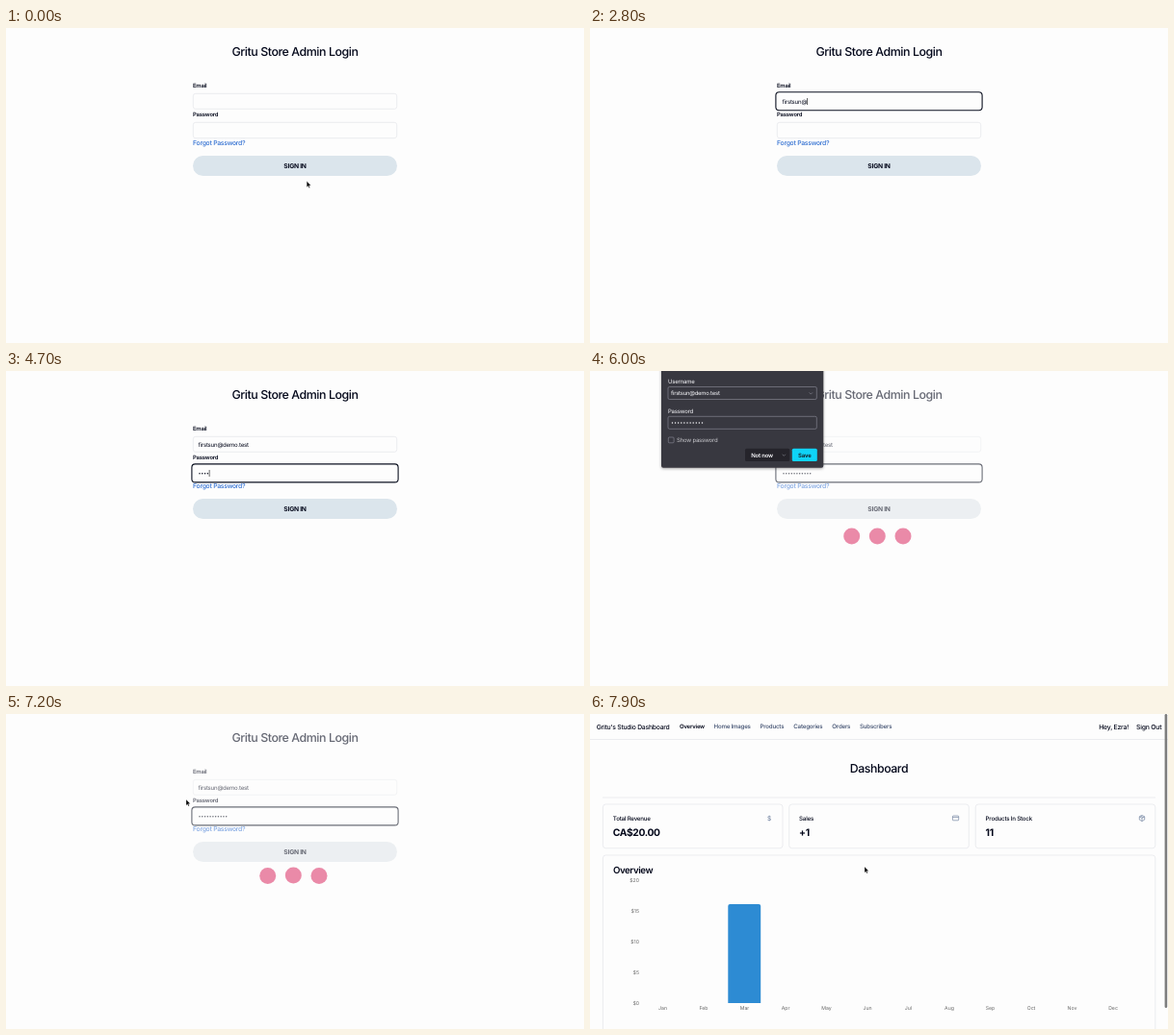
Write an HTML page that moves like this. It is 600 px wide and 328 px high and loops after 8 s.

```html
<!DOCTYPE html>
<html lang="en">
<head>
<meta charset="utf-8">
<title>Store admin login</title>
<style>
  html, body { margin: 0; width: 100%; height: 100%; overflow: hidden; background: #fdfdfd; }
  svg { display: block; width: 600px; height: 328px; }
  text { font: 500 6px Inter, "Open Sans", sans-serif; letter-spacing: -.035em; fill: #03071a; text-rendering: geometricPrecision; }
  .field, .card { fill: #fdfdfd; stroke: #e4e6ea; stroke-width: .7; }
  .icon { fill: none; stroke: #5d7193; stroke-width: .6; }
  .axis { font-size: 5.2px; font-weight: 400; letter-spacing: 0; fill: #666; }
  #popup text { fill: #fbfbfe; font-weight: 400; }
  #popup .box { fill: none; stroke: #8f8f9d; stroke-width: .6; }
</style>
</head>
<body>
<svg viewBox="0 0 600 328">
  <defs>
    <filter id="shadow" x="-10%" y="-10%" width="120%" height="125%">
      <feDropShadow dx="0" dy="1" stdDeviation="1.6" flood-opacity=".35"/>
    </filter>
  </defs>
  <g id="login">
    <g id="form"></g>
    <g id="loader" fill="#ea8aa8"></g>
    <g id="popup"></g>
  </g>
  <g id="dash"></g>
  <path id="pointer" d="M0 0V6.2L1.4 4.9L2.3 7L3.3 6.6L2.4 4.5H4.3Z" fill="#000" stroke="#fff" stroke-width=".3"/>
</svg>
<script>
const LOOP = 8000, LOADING = 6000, POPUP_END = 6800, DASH = 7600, GROW = 7700;
const EMAIL = 'firstsun@demo.test';
const emailKeys = [1400, 1500, 1700, 1900, 2300, 2400, 2500, 2600, 2800,
  2900, 3100, 3200, 3300, 3400, 3600, 3700, 3800, 3900];
const passKeys = [4300, 4500, 4600, 4700, 4900, 5000, 5000, 5200, 5300, 5400, 5700];
const path = [[100, 312.2, 159.6], [600, 290, 87], [900, 290, 87],
  [6300, 258, 104], [6700, 187, 89], [7300, 187, 89], [7700, 285, 159]];

const $ = id => document.getElementById(id);
const text = (x, y, s, attrs = '') => `<text x="${x}" y="${y}" ${attrs}>${s}</text>`;
const rect = (x, y, w, h, r, attrs = '') =>
  `<rect x="${x}" y="${y}" width="${w}" height="${h}" rx="${r}" ${attrs}/>`;
const font = (size, weight = 500, more = '') => `style="font-size:${size}px;font-weight:${weight};${more}"`;
const mid = 'text-anchor="middle" ';
const dots = (n, x, y, step) =>
  Array.from({length: n}, (_, i) => `<circle cx="${x + i * step}" cy="${y}" r=".75"/>`).join('');

$('form').innerHTML =
  text(300, 28.5, 'Gritu Store Admin Login', mid + font(12.4)) +
  text(194, 62.3, 'Email', font(5.9, 600)) + text(194, 92.3, 'Password', font(5.9, 600)) +
  rect(194.3, 68.3, 211.4, 16, 2.5, 'class="field"') +
  rect(194.3, 98.3, 211.4, 16.4, 2.5, 'class="field"') +
  text(194, 122.3, 'Forgot Password?', font(6.8, 500, 'fill:#2a6bd0')) +
  rect(194, 133, 212, 21, 10.5, 'id="button"') +
  text(300, 146.2, 'SIGN IN', mid + font(6.7, 700)) +
  rect(192.9, 0, 214.2, 19, 3.5, 'id="ring" fill="#fdfdfd" stroke="#0b1020" stroke-width="1.1"') +
  text(199.5, 78.6, '', 'id="email" ' + font(6.1, 400)) +
  '<g id="pass" fill="#070b1a"></g>' +
  rect(0, 0, .6, 7, 0, 'id="caret"');

$('loader').innerHTML = [271.7, 298.3, 325].map(x => `<circle cx="${x}" r="8.5"/>`).join('');

$('popup').innerHTML =
  rect(74, -8, 168.3, 108.8, 2, 'fill="#38373f" filter="url(#shadow)"') +
  text(81, 12.6, 'Username') + rect(81, 16.5, 154.3, 13, 1.5, 'class="box"') +
  text(84, 25.1, EMAIL, font(5.9, 400)) +
  '<path class="box" d="M227.6 22.4l1.7 1.7l1.7-1.7"/>' +
  text(81, 43.6, 'Password') + rect(81, 47.3, 154.3, 13, 1.5, 'class="box"') +
  `<g fill="#fbfbfe">${dots(11, 85.5, 54, 3.1)}</g>` +
  rect(81.3, 69, 5.8, 5.8, 1, 'class="box"') +
  text(90, 74.1, 'Show password', 'opacity=".75"') +
  rect(161, 80.7, 46.3, 13.4, 1.5, 'fill="#25242b"') +
  text(178.5, 89.5, 'Not now', mid + font(6, 600)) +
  '<path class="box" d="M199.7 86.8l1.6 1.6l1.6-1.6"/>' +
  rect(209.8, 80.7, 26, 13.4, 1.5, 'fill="#0fd3f7"') +
  text(222.8, 89.5, 'Save', mid + font(6, 600, 'fill:#15141a'));

const nav = [[128.5, 'Home Images'], [176.5, 'Products'], [211.3, 'Categories'], [251.3, 'Orders'], [280, 'Subscribers']];
const cards = [[13.4, 'Total Revenue', 'CA$20.00'], [206.7, 'Sales', '+1'], [400.2, 'Products In Stock', '11']];
const months = 'Jan Feb Mar Apr May Jun Jul Aug Sep Oct Nov Dec'.split(' ');
$('dash').innerHTML =
  rect(0, 0, 600, 328, 0, 'fill="#fdfdfd"') +
  text(6.7, 15.6, "Gritu's Studio Dashboard", font(6.8)) +
  text(93, 15.3, 'Overview', font(6, 600)) +
  nav.map(([x, s]) => text(x, 15.3, s, font(6.2, 500, 'fill:#3a4a6b'))).join('') +
  text(559, 15.6, 'Hey, Ezra!', 'text-anchor="end" ' + font(6.9)) +
  text(593.3, 15.6, 'Sign Out', 'text-anchor="end" ' + font(6.9)) +
  '<path d="M0 26.5H600M13 87H587" stroke="#e4e6ea" stroke-width=".7"/>' +
  text(300, 60.9, 'Dashboard', mid + font(12.3)) +
  cards.map(([x, name, value]) => rect(x, 94, 186.6, 45.8, 3, 'class="card"') +
    text(x + 10.4, 110.7, name, font(6.2)) + text(x + 10.4, 126.8, value, font(10.3, 700))).join('') +
  text(186, 110.8, '$', mid + font(6.5, 400, 'fill:#5d7193')) +
  rect(376.4, 106, 6.3, 4.8, .8, 'class="icon"') + '<path class="icon" d="M376.4 107.6h6.3"/>' +
  '<path class="icon" d="M573 105.4l2.7 1.5v3.2l-2.7 1.5l-2.7-1.5v-3.2ZM570.3 106.9l2.7 1.5l2.7-1.5M573 108.4v3.2M571.6 106.1l2.7 1.6"/>' +
  rect(13.4, 147, 573.4, 200, 3, 'class="card"') +
  text(24, 165.7, 'Overview', font(9.7, 600, 'letter-spacing:-.045em')) +
  [0, 5, 10, 15, 20].map(v => text(51, 302.9 - v * 6.4, '$' + v, 'class="axis" text-anchor="end"')).join('') +
  months.map((m, i) => text(75.5 + 42.5 * i, 307.9, m, mid + 'class="axis"')).join('') +
  '<path id="bar" fill="#2d8bd3"/>' +
  rect(596.6, 0, 2.6, 306, 1.3, 'id="scrollbar" fill="#7d7d7d"');

const count = (keys, t) => keys.filter(k => k <= t).length;
const show = (el, on) => el.setAttribute('visibility', on ? 'visible' : 'hidden');
const set = (el, attrs) => { for (const k in attrs) el.setAttribute(k, attrs[k]); };

// cubic-bezier(.25, .1, .25, 1)
function ease(x) {
  if (x <= 0 || x >= 1) return Math.max(0, Math.min(1, x));
  const curve = (a, b, s) => 3 * a * s * (1 - s) ** 2 + 3 * b * s * s * (1 - s) + s ** 3;
  let lo = 0, hi = 1;
  for (let i = 0; i < 20; i++) {
    const s = (lo + hi) / 2;
    if (curve(.25, .25, s) < x) lo = s; else hi = s;
  }
  return curve(.1, 1, lo);
}

function pointerAt(t) {
  const i = path.findIndex(p => p[0] > t);
  if (i < 1) return (i ? path[path.length - 1] : path[0]).slice(1);
  const [t0, x0, y0] = path[i - 1], [t1, x1, y1] = path[i];
  const p = (t - t0) / (t1 - t0), s = p * p * (3 - 2 * p);
  return [x0 + (x1 - x0) * s, y0 + (y1 - y0) * s];
}

function render(t) {
  const loading = t >= LOADING, onPass = t >= 4000;
  $('dash').style.display = t >= DASH ? '' : 'none';
  $('loader').style.display = loading ? '' : 'none';
  $('popup').style.display = loading && t < POPUP_END ? '' : 'none';
  set($('form'), {opacity: loading ? .6 : 1});

  const [px, py] = pointerAt(t);
  set($('pointer'), {transform: `translate(${px} ${py})`});
  show($('pointer'), t < 900 || t >= 6300);
  set($('button'), {fill: loading ? '#e2e7eb' : t < 900 && py > 133 && py < 154 ? '#e6edf2' : '#dbe5ec'});

  show($('ring'), t >= 1000);
  set($('ring'), {y: onPass ? 96.9 : 66.8});
  $('email').textContent = EMAIL.slice(0, count(emailKeys, t));
  const n = count(passKeys, t);
  $('pass').innerHTML = dots(n, 201, 106.8, 2.77);
  show($('caret'), t >= 1000 && t < 5800);
  set($('caret'), onPass ? {x: 199.7 + n * 2.77, y: 103}
    : {x: 199.7 + $('email').getComputedTextLength(), y: 73});

  [...$('loader').children].forEach((dot, i) => {
    const p = Math.max(0, t - LOADING - i * 80) / 750;
    set(dot, {cy: 172 - 2 * (1 - Math.cos(2 * Math.PI * p))});
  });

  const h = 128 * ease((t - GROW) / 400), r = Math.min(2, h);
  set($('bar'), {d: `M143.3 301v${r - h}q0 ${-r} 2 ${-r}h29.9q2 0 2 ${r}v${h - r}Z`});
  show($('scrollbar'), t >= 7800);
}

const start = performance.now();
function tick(now) {
  render(Math.max(0, now - start) % LOOP);
  requestAnimationFrame(tick);
}
render(0);
requestAnimationFrame(tick);
</script>
</body>
</html>
```
